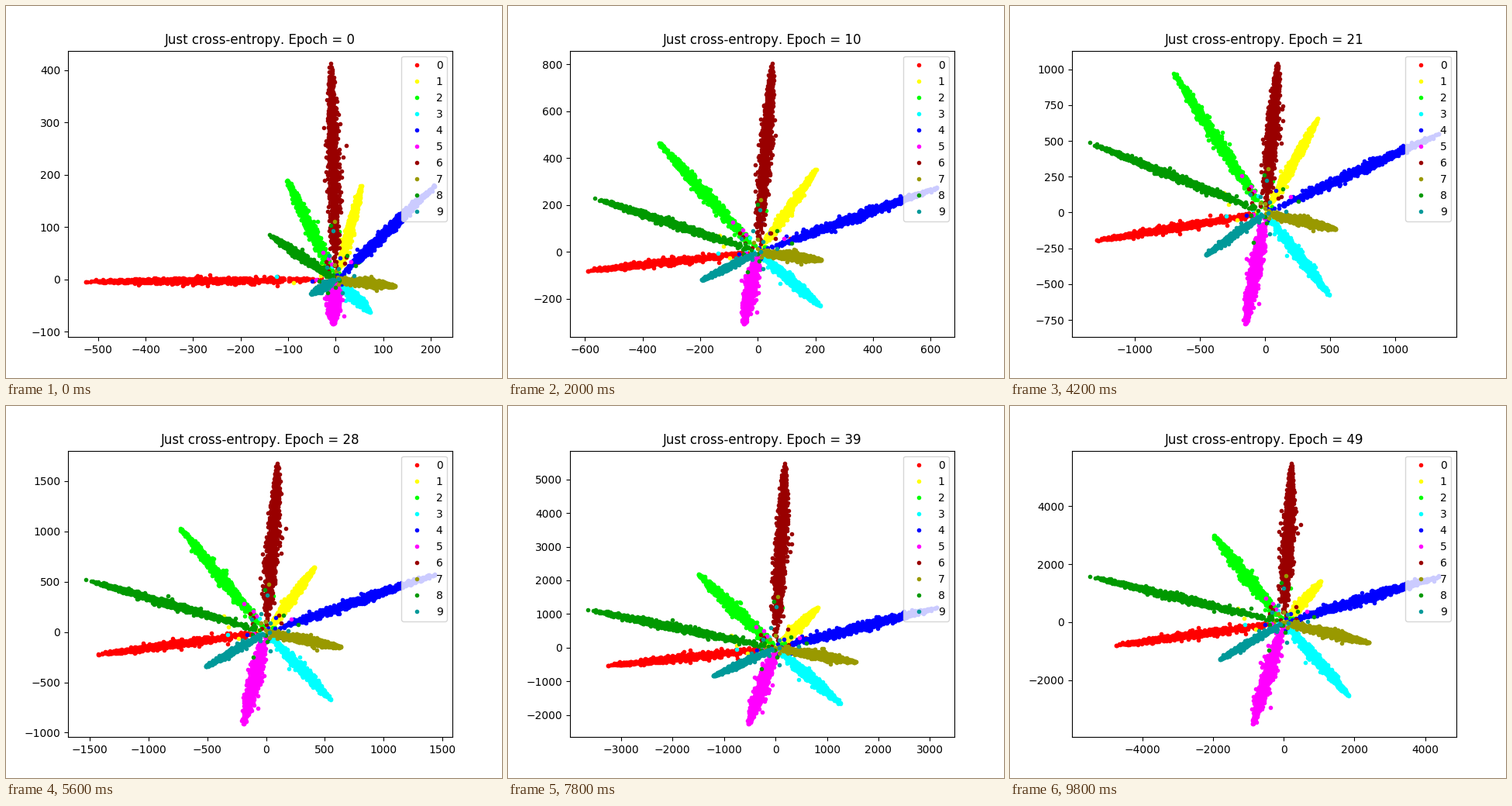
Recreate the animation shown at these times as a matplotlib script. Size 640x480 px, loop 10 s.

```python
import numpy as np
import matplotlib.pyplot as plt
from matplotlib.animation import FuncAnimation

plt.rcParams["text.kerning_factor"] = 6

EPOCHS = 50
POINTS = 1000
STRAYS = 8
TALL = 6           # the upright class, which sets the height of the plot
SETTLE = 2.5       # epochs in which the first layout fades out
BOX = np.array([451, 336])   # data area in pixels, inside the margins

# Colour, spread in pixels, then the ray's tip at the very start, when young
# and at the end, in units of the plot's reach
RAYS = [
    ("#ff0000", 1.3, -2.53 - .02j, -.88 - .12j, -1.08 - .18j),
    ("#ffff00", 1.5, .26 + .86j, .35 + .62j, .24 + .32j),
    ("#00ff00", 2.1, -.49 + .91j, -.58 + .76j, -.45 + .68j),
    ("#00ffff", 1.8, .35 - .30j, .33 - .32j, .42 - .58j),
    ("#0000ff", 1.7, 1 + .86j, 1 + .45j, 1 + .36j),
    ("#ff00ff", 2.4, -.03 - .41j, -.05 - .42j, -.20 - .80j),
    ("#990000", 2.6, -.05, .09, .05),
    ("#999900", 1.6, .60 - .06j, .30 - .03j, .55 - .16j),
    ("#009900", 1.4, -.67 + .41j, -.83 + .37j, -1.25 + .36j),
    ("#009999", 1.0, -.25 - .13j, -.29 - .17j, -.41 - .29j),
]
colors, spread, first, young, late = map(np.array, zip(*RAYS))

# Size of the embedding over the epochs: reach to the right, and height
KEYS = [0, 6, 14, 21, 34, 43, 49]
REACH = [208, 569, 680, 1337, 1527, 5576, 4392]
HEIGHT = [412, 975, 660, 1040, 2516, 10162, 5469]


def grow(sizes, epoch):
    return np.exp(np.interp(epoch, KEYS, np.log(sizes)))


def ray_tips(epoch):
    """Tips of all rays in data units, one row per class."""
    u = epoch / (EPOCHS - 1)
    tip = young + (late - young) * u
    tip = tip + (first - tip) * np.exp(-epoch / SETTLE)
    tip = tip * grow(REACH, epoch)
    xy = np.column_stack([tip.real, tip.imag])
    xy[TALL, 1] = grow(HEIGHT, epoch)
    return xy


rng = np.random.default_rng(7)
along = rng.beta(2.7, 2.1, (len(RAYS), POINTS))
along /= along.max(axis=1, keepdims=True)
across = rng.standard_t(7, along.shape)
stray_ray = rng.integers(0, len(RAYS), (len(RAYS), STRAYS))
stray_pos = np.minimum(rng.exponential(.09, stray_ray.shape) + .02, .25)
stray_off = rng.normal(0, 6, (*stray_ray.shape, 2))


def cloud(c, tips, noise):
    """Points of one class in pixels from the origin."""
    r = along[c]
    off = .8 * across[c] + .6 * noise.normal(size=POINTS)
    off *= spread[c] * 1.25 * np.sin(np.pi * (.15 + .75 * r))
    off[r.argmax()] = 0
    normal = np.array([-tips[c, 1], tips[c, 0]]) / np.hypot(*tips[c])
    strays = tips[stray_ray[c]] * stray_pos[c][:, None] + stray_off[c]
    return np.vstack([np.outer(r, tips[c]) + np.outer(off, normal), strays])


fig, ax = plt.subplots(figsize=(6.4, 4.8), dpi=100)
lines = [ax.plot([], [], ".", color=color, label=str(c))[0]
         for c, color in enumerate(colors)]
ax.legend(loc="upper right")
title = ax.set_title("")


def draw(epoch):
    noise = np.random.default_rng(100 + epoch)
    tips = ray_tips(epoch)
    scale = BOX / np.ptp(tips, axis=0)
    for c, line in enumerate(lines):
        line.set_data(*(cloud(c, tips * scale, noise) / scale).T)
    ax.relim()
    ax.autoscale_view()
    title.set_text(f"Just cross-entropy. Epoch = {epoch}")
    return lines


anim = FuncAnimation(fig, draw, frames=EPOCHS, init_func=lambda: draw(0),
                     interval=200, repeat=True, repeat_delay=0, blit=False)
plt.show()
```
